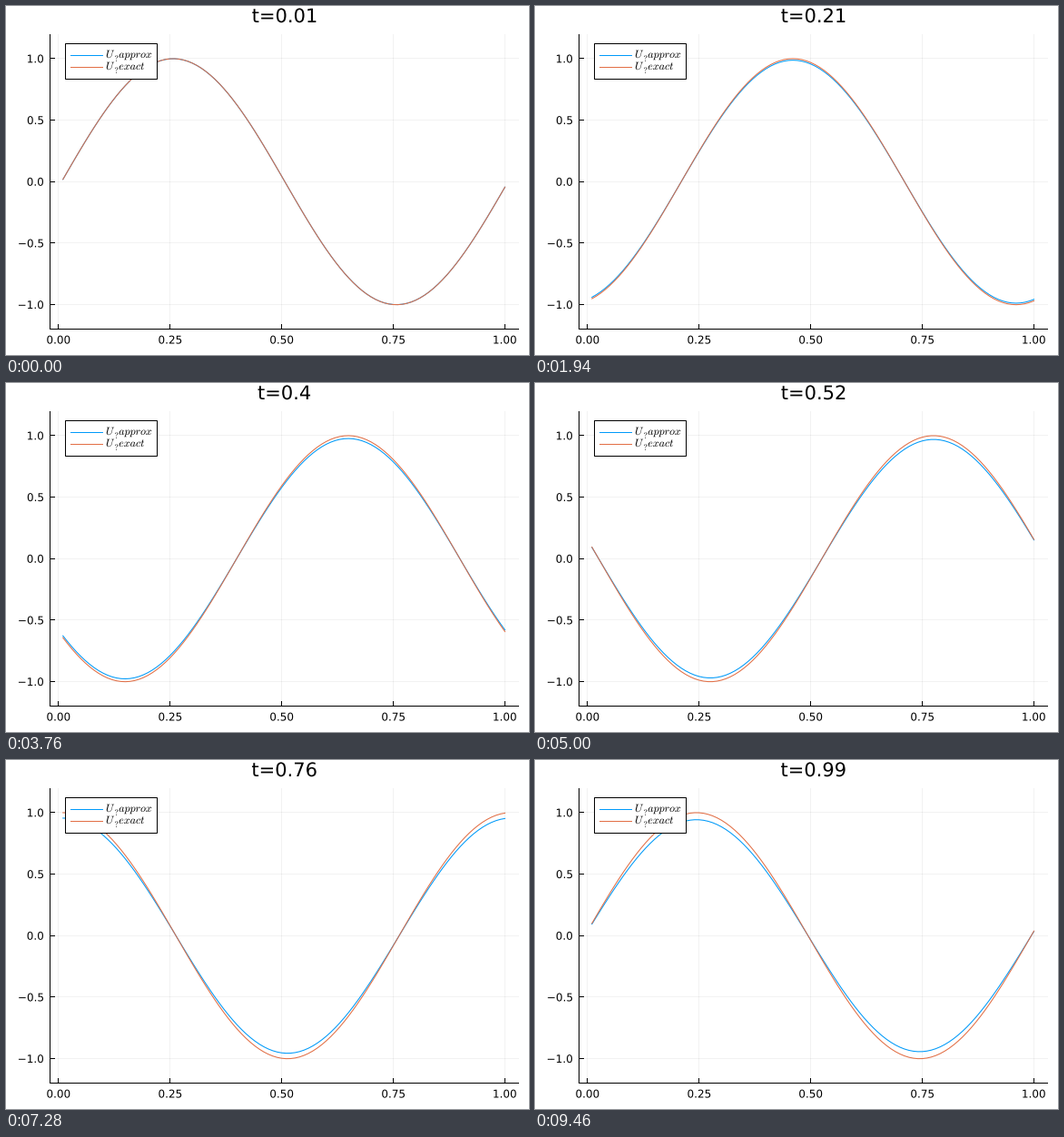
A matplotlib script for the animation above (9480 ms loop, 576x384 px).

```python
import numpy as np
import matplotlib.pyplot as plt
from matplotlib.animation import FuncAnimation
from matplotlib.patches import PathPatch, Rectangle
from matplotlib.path import Path
from matplotlib.textpath import TextPath

W, H, DPI = 576, 384, 96
PX = 72 / DPI                      # one pixel in points
BLUE, ORANGE = "#009af9", "#e26f46"
LEFT, RIGHT, TOP, BOTTOM = 48, 564, 31, 355

# Upwind scheme for u_t + u_x = 0 on a periodic grid
STEP, CFL, POSES = 0.01, 0.7, 142
GRID = np.arange(1, 101) * STEP
WAVE = np.exp(2j * np.pi * GRID)
GAIN = 1 - CFL * (1 - np.exp(-2j * np.pi * STEP))

# Poses are held for either 100 or 20 ms
TICK, LOOP = 20, 9480
ORDER = np.arange(POSES)
STARTS = 20 * ORDER + 80 * np.floor(0.591 * ORDER + 0.5)

plt.rcParams.update({"font.family": "DejaVu Sans", "mathtext.fontset": "cm"})


def to_x(v):
    return 57.8 + 491.7 * v


def to_y(v):
    return 193.3 - 135.35 * v


fig = plt.figure(figsize=(W / DPI, H / DPI), dpi=DPI, facecolor="white")
ax = fig.add_axes([0, 0, 1, 1])
ax.set_xlim(0, W)
ax.set_ylim(H, 0)
ax.axis("off")


def line(xs, ys, color="black", width=1.0, **kw):
    return ax.plot(xs, ys, color=color, lw=width * PX, **kw)[0]


def text_path(x, y, text, size, align="left"):
    """Outline of a text with its baseline at y, in stage pixels."""
    glyphs = TextPath((0, 0), text, size=size)
    box = glyphs.get_extents()
    shift = {"left": 0, "center": (box.x0 + box.x1) / 2, "right": box.x1}[align]
    return Path(glyphs.vertices * (1, -1) + (x - shift, y), glyphs.codes)


def label(*args, **kw):
    patch = PathPatch(text_path(*args, **kw), fc="black", lw=0, zorder=6)
    return ax.add_patch(patch)


def draw_axes():
    for v in (0, 0.25, 0.5, 0.75, 1):
        x = np.floor(to_x(v))
        line([x, x], [TOP, BOTTOM], alpha=0.05, zorder=1)
        line([x, x], [BOTTOM, BOTTOM - 5], zorder=4)
        label(to_x(v), 371.5, f"{v:.2f}", 12, align="center")
    for v in (-1, -0.5, 0, 0.5, 1):
        y = np.floor(to_y(v))
        line([LEFT, RIGHT], [y, y], alpha=0.05, zorder=1)
        line([LEFT, LEFT + 5], [y, y], zorder=4)
        text = f"{v:.1f}".replace("-", "\u2212")
        label(41, to_y(v) + 4.4, text, 12, align="right")
    line([LEFT, LEFT], [TOP, BOTTOM], zorder=4)
    line([LEFT, RIGHT], [BOTTOM, BOTTOM], zorder=4)


def draw_legend():
    ax.add_patch(Rectangle((65, 41), 101, 39, fc="white", ec="black",
                           lw=PX, zorder=5))
    for y, color, name in ((54, BLUE, "approx"), (67, ORANGE, "exact")):
        line([71, 106], [y, y], color, zorder=6)
        label(110, y + 3, "$U$", 12)
        label(119.6, y + 6.8, r"$\mathrm{?}$", 9)
        label(124.2, y + 3, f"${name}$", 12)


draw_axes()
draw_legend()
approx = line([], [], BLUE, 1.05, zorder=2)
exact = line([], [], ORANGE, 1.05, zorder=3)
title = label(306.3, 18, "t=0", 21, align="center")


def update(frame):
    n = int(np.searchsorted(STARTS, frame * TICK, side="right"))
    t = n * CFL * STEP
    approx.set_data(to_x(GRID), to_y((GAIN ** n * WAVE).imag))
    exact.set_data(to_x(GRID), to_y(np.sin(2 * np.pi * (GRID - t))))
    text = f"t={round(7 * n / 10) / 100}"
    title.set_path(text_path(306.3, 18, text, 21, align="center"))
    return approx, exact, title


anim = FuncAnimation(fig, update, frames=LOOP // TICK, interval=TICK, repeat=True)
plt.show()
```
